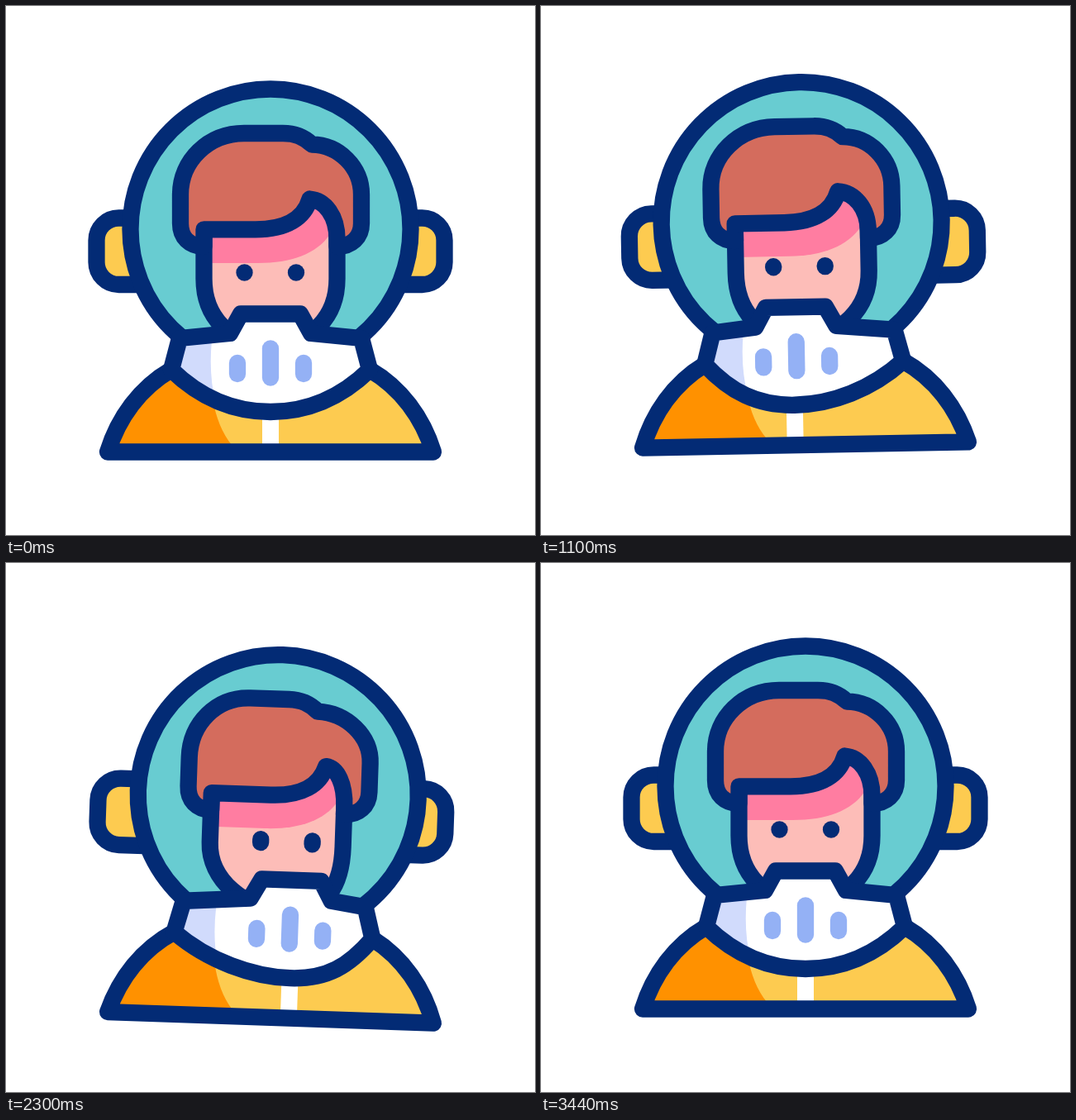
Animation, 640 px wide and 640 px high, one loop 3.6 s. Source, as an HTML page with a canvas:

```html
<!DOCTYPE html>
<html>
<head>
<meta charset="utf-8">
<style>
  html, body { margin: 0; width: 100%; height: 100%; overflow: hidden; background: #fff; }
  canvas { display: block; }
</style>
</head>
<body>
<canvas id="stage" width="640" height="640"></canvas>
<script>
const ctx = document.getElementById('stage').getContext('2d');
const LOOP = 3600, BASE = 539.5;
const NAVY = '#032b75', TEAL = '#68ccd1', YELLOW = '#fdcb50', ORANGE = '#ff9100',
      HAIR = '#d46c5d', SKIN = '#fdbdb8', PINK = '#ff7da1', SHADE = '#d1dbfc', BLUE = '#94b1f5';

// Each track lists [time, value] pairs, eased in and out between them.
const LEAN = [[0, 0], [420, -1], [760, -1], [1645, 1], [2140, 1], [2540, 0]];
const TURN = [[0, 0], [430, -1], [545, -1], [1790, 1], [2100, 1], [2550, 0]];
const BOB = [[90, 0], [1080, -8.5], [2160, 9.5], [2560, 12.8], [3430, 0]];
const LIFT = [[2395, 0], [2825, 2.65], [3430, 0]];

function track(keys, t) {
  const i = keys.findIndex(k => k[0] > t);
  if (i < 0) return keys[keys.length - 1][1];
  if (i === 0) return keys[0][1];
  const [t0, a] = keys[i - 1], [t1, b] = keys[i];
  const x = (t - t0) / (t1 - t0);
  return a + (b - a) * x * x * (3 - 2 * x);
}

function shape(d, fill, stroke) {
  const path = new Path2D(d);
  if (fill) { ctx.fillStyle = fill; ctx.fill(path); }
  if (stroke) { ctx.strokeStyle = stroke; ctx.stroke(path); }
}

// Fills one area of a shape with a second colour.
function shade(outline, d, fill) {
  ctx.save();
  ctx.clip(new Path2D(outline));
  shape(d, fill);
  ctx.restore();
}

function shifted(x, y, draw) {
  ctx.save();
  ctx.translate(x, y);
  draw();
  ctx.restore();
}

const bar = (x, y, half, color) => shape(`M${x} ${y - half}V${y + half}`, null, color);

function drawHelmet(turn) {
  const ears = new Path2D();
  ears.roundRect(109.5, 256.5, 100, 80.5, 27);
  ears.roundRect(430.5, 256.5, 100, 80.5, 27);
  shifted(-12 * turn, 0, () => {
    ctx.fillStyle = YELLOW;
    ctx.fill(ears);
    ctx.strokeStyle = NAVY;
    ctx.stroke(ears);
  });
  shape('M150.5 270a169.5 169.5 0 1 1 339 0a169.5 169.5 0 1 1 -339 0z', TEAL, NAVY);
}

function drawHead(turn, lift) {
  const chin = 25 * turn;
  const face = `M400.5 215H239.5V330C239.5 375 ${270 + chin} 410 ${320 + chin} 410
    S400.5 375 400.5 330z`;
  shape(face, SKIN);
  shape('M240 311H305C345 311 376 300 392 276V225H240z', PINK);
  shape(face, null, NAVY);

  const look = Math.abs(turn);
  shifted(21.3 * turn, 6.5 * look - 7 * lift, () => {
    const half = 0.01 + 3.3 * look + 1.9 * lift;
    bar(288.5, 322.5, half, NAVY);
    bar(351, 322.5, half, NAVY);
  });

  const sway = 17 * turn - 2 * turn * turn, top = -10 * turn;
  shape(`M239.5 270.3V291C222 291 211 280 211 263V228
    C211 187 ${245 + top * 0.6} 154 ${288 + top} 154H${335 + top}
    C${350 + top} 154 ${360 + top} 158 ${370 + top} 167.5
    C${403 + top * 0.6} 168 430 195 430 228V263C430 280 418 291 400.5 291V282
    C400.5 254 ${386 + sway * 0.5} 235 ${367.5 + sway} 233.5
    C${361 + sway} 256 ${340 + sway} 270.3 ${302 + sway} 270.3z`, HAIR, NAVY);
}

function drawBody(lean, rise) {
  const slide = 35.5 * lean - 2.5 * lean * lean;
  const y = 440 + rise;
  const body = `M123 ${BASE}C136 ${498 + rise * 0.4} 162 ${462 + rise} 200 ${y}
    H440C478 ${462 + rise} 504 ${498 + rise * 0.4} 517 ${BASE}z`;
  shape(body, YELLOW);
  shade(body, `M90 560V400H250V${475 + rise}Q256 ${510 + rise * 0.5} 273 531V560z`, ORANGE);
  shape(`M${310 + slide} ${470 + rise}h20V${BASE}h-20z`, '#fff');
  shape(body, null, NAVY);

  const m = 28 * lean + 4 * lean * lean;
  const edge = 247.5 + 4.5 * lean - 4.5 * lean * lean;
  const mask = `M210 402L${271 + m} 396L${284 + m} 372.5H${356 + m}L${369 + m} 396L430 402L440 440
    C${405 + slide * 0.35} 474 ${365 + slide} 491 ${320 + slide} 491
    S${235 + slide * 0.35} 474 200 440z`;
  shifted(0, rise, () => {
    shape(mask, '#fff');
    shade(mask, `M190 380H${edge + 5}Q${edge - 5} 435 ${edge + 6} 480V500H190z`, SHADE);
    shape(mask, null, NAVY);
    shifted(m, 0, () => {
      bar(280, 438.5, 6.5, BLUE);
      bar(320, 432, 17.5, BLUE);
      bar(360, 438.5, 6.5, BLUE);
    });
  });
}

function frame() {
  const t = performance.now() % LOOP;
  const lean = track(LEAN, t), turn = track(TURN, t), lift = track(LIFT, t);
  ctx.fillStyle = '#fff';
  ctx.fillRect(0, 0, 640, 640);
  ctx.lineWidth = 20.3;
  ctx.lineCap = ctx.lineJoin = 'round';
  ctx.save();
  ctx.translate(320, BASE + track(BOB, t));
  ctx.rotate(lean * 3.05 * Math.PI / 180);
  ctx.translate(-320, -BASE);
  shifted(0, -11 * lift, () => drawHelmet(turn));
  shifted(0, -13.8 * lift, () => drawHead(turn, lift));
  drawBody(lean, -14.5 * lift);
  ctx.restore();
  requestAnimationFrame(frame);
}
frame();
</script>
</body>
</html>
```
